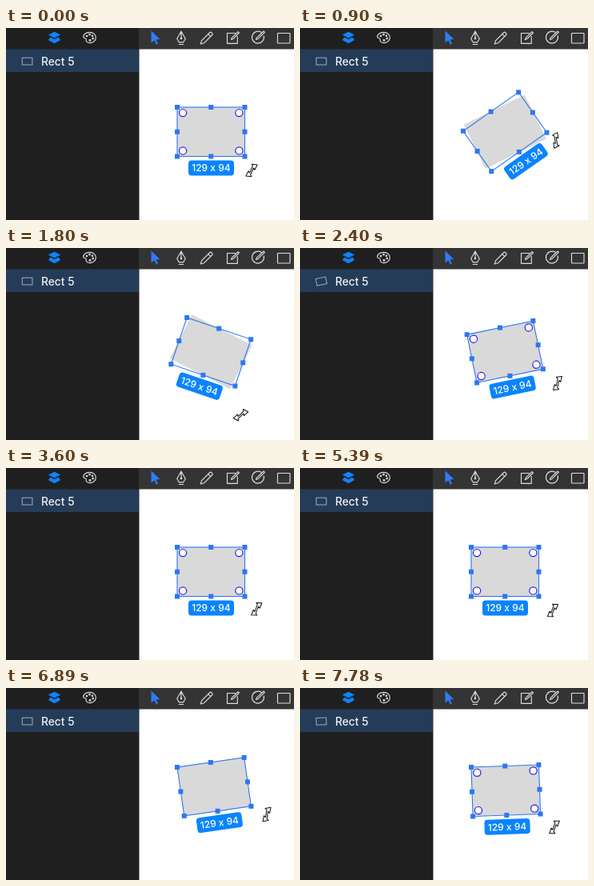
Recreate the animation shown at these times as an HTML page. Size 360 by 240 pixels, loop 8 s.

```html
<!DOCTYPE html>
<html lang="en">
<head>
<meta charset="utf-8">
<title>Rotating a rectangle</title>
<style>
  html, body { margin: 0; width: 100%; height: 100%; overflow: hidden; background: #fff; }
  svg { display: block; width: 100vw; height: 100vh; }
  text { font-family: Inter, Roboto, "Liberation Sans", sans-serif; font-weight: 500; }
  .tool { fill: none; stroke: #dcdcdc; stroke-width: 1.15; stroke-linejoin: round; stroke-linecap: round; }
  .knob { fill: #fff; stroke: #211fe0; stroke-width: 1.2; }
</style>
</head>
<body>
<svg viewBox="0 0 360 240">
  <rect width="360" height="240" fill="#fff"/>
  <rect width="166.500" height="240" fill="#1f1f1f"/>
  <rect x="166" width="194" height="26.500" fill="#343435"/>
  <rect y="26.500" width="166" height="28.500" fill="#253c58"/>

  <!-- panel tabs -->
  <g fill="#0f83ff">
    <path d="M60.500 4.700 68.200 8.600 60.500 12.500 52.800 8.600Z"/>
    <path d="M55.500 11.600 60.500 14.200 65.500 11.600 68.200 15 60.500 19.300 52.800 15Z"/>
  </g>
  <g class="tool" stroke-width="1">
    <path d="M104.500 5.300C100 5.300 96.700 8 96.700 11.200C96.700 12.800 98.500 12.600 99.700 13.200C101 14 99.700 15.500 100.500 16.800C101.500 18.500 103.500 18.700 105.300 18.600C109.600 18.300 112.300 15.300 112.300 11.900C112.300 8 109 5.300 104.500 5.300Z"/>
    <circle cx="101" cy="10" r=".8"/>
    <circle cx="104.500" cy="8.200" r=".8"/>
    <circle cx="108" cy="9.800" r=".8"/>
    <circle cx="108.700" cy="13" r=".8"/>
    <circle cx="105" cy="15.300" r="1"/>
  </g>

  <!-- tools -->
  <path d="M181.500 3.500 192.300 14 187.600 14.400 190 19.800 187.900 20.700 185.500 15.400 181.500 18.600Z" fill="#2f7bf6"/>
  <g class="tool">
    <path d="M219 4C217.500 8 214.500 11 213.800 13.500L216.300 17.800H221.700L224.200 13.500C223.500 11 220.500 8 219 4ZM219 5V12M216.300 20.500H221.700"/>
    <circle cx="219" cy="13" r=".8"/>
    <path d="M243.300 20 244.500 15.800 254.800 5.500Q255.700 4.800 256.500 5.500L257.900 6.900Q258.600 7.700 257.900 8.500L247.500 18.800ZM252.700 7.600 255.800 10.700"/>
    <path d="M286.500 6.500H276.500V19.300H289.300V10.500M281.500 14.500 282.200 12.400 290 4.600 291.400 6 283.600 13.800Z"/>
    <path d="M319 5.300A7.500 7.500 0 1 0 322.300 10M312.500 14.500 313.200 12.400 322 4 323.400 5.400 314.600 13.800Z"/>
    <rect x="339.500" y="6.500" width="15.500" height="12.500" rx=".5"/>
  </g>

  <!-- layer row -->
  <rect id="thumb" x="20.300" y="37.200" width="12.600" height="8.800" fill="none" stroke="#a3aab3"/>
  <text x="44" y="46.500" font-size="13.800" fill="#eef1f5">Rect 5</text>

  <!-- shape -->
  <rect id="fill" x="214" y="99" width="84.500" height="61.500" fill="#d9d9d9"/>
  <g id="frame">
    <rect x="214" y="99" width="84.500" height="61.500" fill="none" stroke="#2f76f2" stroke-width="1.100"/>
    <g id="knobs"></g>
    <rect x="228" y="165.500" width="57" height="19" rx="4" fill="#0a84ff"/>
    <text x="256.400" y="179.400" font-size="12" text-anchor="middle" fill="#fff">129 x 94</text>
  </g>
  <g id="handles" fill="#2f76f2"></g>
  <path id="pointer" fill="#fff" stroke="#111" stroke-linejoin="round"
    d="M10 0 5.600 -5.500 4.900 -2.900 -3.900 .4 -3.300 -2.300 -10 0 -5.600 5.500 -4.900 2.900 3.900 -.4 3.300 2.300Z"/>
</svg>
<script>
  const LOOP = 8000, TICK = 150;
  const RELEASE = 2400, UNDO = 3300, SECOND = 5390, SECOND_RELEASE = 7780;
  const $ = id => document.getElementById(id);
  const box = { x: 214, y: 99, w: 84.5, h: 61.5 };
  const mid = [box.x + box.w / 2, box.y + box.h / 2];
  const corner = [box.x, box.y];

  // key poses: time, angle, pointer x, pointer y
  const keys = [
    [450, 0, 307, 178], [1050, -41, 322, 134], [1350, -27.6, 321, 154],
    [1500, 12, 301, 217], [1650, 29, 284, 222], [2100, -11.7, 322, 169],
    [3150, -11.7, 322, 169], [UNDO, 0, 320, 171], [3750, 0, 311, 178],
    [5250, 0, 311, 178], [SECOND, 0, 316, 178], [5990, -21.6, 334, 137],
    [6140, -19.7, 331, 146], [6440, 14.5, 295, 197], [6890, -8.2, 326, 158],
    [7040, -10.6, 327, 157], [7490, -2, 318, 174]
  ];

  function pose(t) {
    const n = keys.findIndex(k => k[0] > t);
    if (n < 1) return (n ? keys.at(-1) : keys[0]).slice(1);
    const a = keys[n - 1], b = keys[n];
    const e = (1 - Math.cos(Math.PI * (t - a[0]) / (b[0] - a[0]))) / 2;
    return a.slice(1).map((v, i) => v + (b[i + 1] - v) * e);
  }

  const turn = (el, deg, [x, y]) => el.setAttribute('transform', `rotate(${deg} ${x} ${y})`);

  function rotated(x, y, deg, [px, py]) {
    const a = deg * Math.PI / 180, c = Math.cos(a), s = Math.sin(a);
    return [px + (x - px) * c - (y - py) * s, py + (x - px) * s + (y - py) * c];
  }

  function add(parent, tag, attrs) {
    const el = document.createElementNS('http://www.w3.org/2000/svg', tag);
    for (const name in attrs) el.setAttribute(name, attrs[name]);
    return parent.appendChild(el);
  }

  const handles = [];
  for (const u of [-1, 0, 1]) for (const v of [-1, 0, 1]) {
    if (!u && !v) continue;
    const x = mid[0] + u * box.w / 2, y = mid[1] + v * box.h / 2;
    handles.push({ el: add($('handles'), 'rect', { width: 6, height: 6 }), x, y });
    if (u && v) add($('knobs'), 'circle', { class: 'knob', cx: x - u * 7.1, cy: y - v * 7.1, r: 4.6 });
  }

  function draw(t) {
    const base = t < SECOND ? 0 : SECOND;
    const now = base + Math.floor((t - base) / TICK) * TICK;
    const [angle, px, py] = pose(now);
    const pivot = base ? corner : mid;
    const firstDrag = t >= 600 && t < RELEASE;
    const dragging = firstDrag || (t >= SECOND + TICK && t < SECOND_RELEASE);

    // the fill trails the outline during the first drag
    const gap = firstDrag ? .8 * (angle - pose(now - TICK)[0]) : 0;
    turn($('fill'), angle - Math.max(-9, Math.min(9, gap)), pivot);
    turn($('frame'), angle, pivot);
    $('knobs').style.display = dragging ? 'none' : '';
    for (const h of handles) {
      const [x, y] = rotated(h.x, h.y, angle, pivot);
      h.el.setAttribute('x', x - 3);
      h.el.setAttribute('y', y - 3);
    }

    // the layer icon follows once the drag ends
    turn($('thumb'), dragging ? 0 : angle, [26.6, 41.6]);

    const [cx, cy] = rotated(...mid, angle, pivot);
    const tilt = Math.atan2(py - cy, px - cx) * 180 / Math.PI - 88;
    $('pointer').setAttribute('transform', `translate(${px} ${py}) rotate(${tilt})`);
  }

  const start = performance.now();
  function frame() {
    draw((performance.now() - start) % LOOP);
    requestAnimationFrame(frame);
  }
  frame();
</script>
</body>
</html>
```
